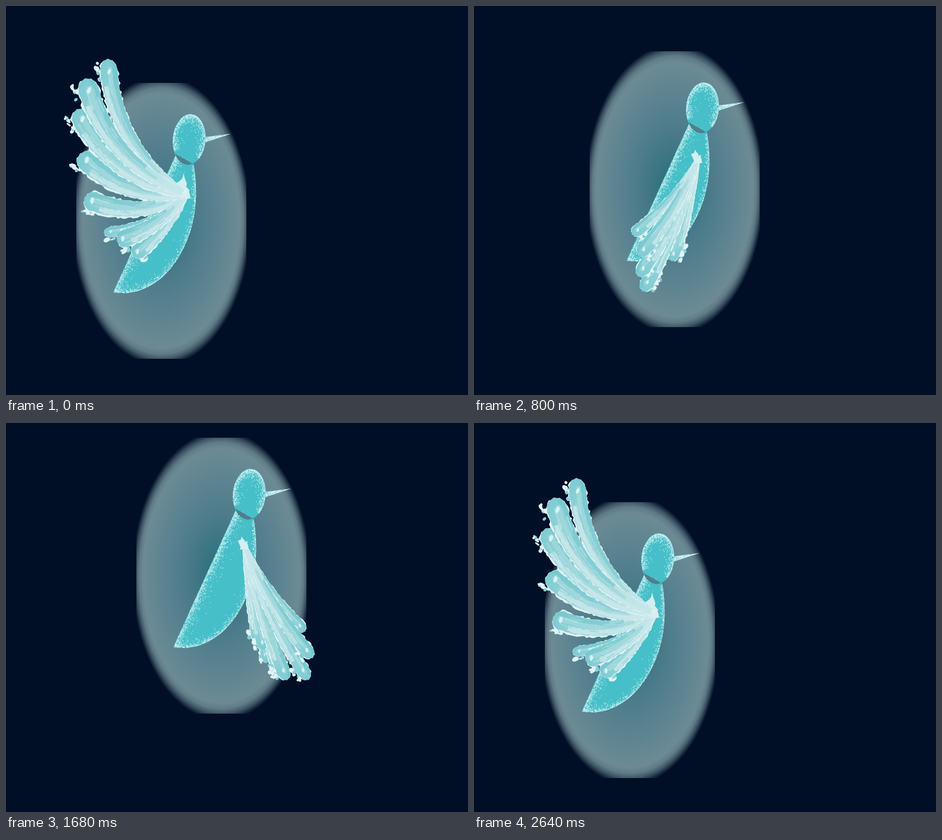
An HTML page with a canvas that plays this animation: 815 by 688 pixels, repeating every 3.12 s.

```html
<!DOCTYPE html>
<html lang="en">
<head>
<meta charset="utf-8">
<title>Hummingbird</title>
<style>
html, body { margin: 0; width: 100%; height: 100%; overflow: hidden; background: #000f26; }
canvas { display: block; }
</style>
</head>
<body>
<canvas id="stage" width="815" height="688"></canvas>
<script>
const W = 815, H = 688, STEP = 80, LOOP = 3120, LAST = 33;
const ctx = document.getElementById('stage').getContext('2d');
const clamp = (v, lo, hi) => Math.min(hi, Math.max(lo, v));
const lerp = (a, b, k) => a + (b - a) * k;

function random(seed) {
  return () => {
    seed = (seed + 0x6D2B79F5) | 0;
    let t = Math.imul(seed ^ (seed >>> 15), 1 | seed);
    t = (t + Math.imul(t ^ (t >>> 7), 61 | t)) ^ t;
    return ((t ^ (t >>> 14)) >>> 0) / 4294967296;
  };
}

// Flight path: time, x, y
const path = [
  [0, 0, 0], [480, 17, -118], [560, 26, -110], [1120, 134, 0],
  [1440, 121, -50], [1680, 106, -110], [1840, 100, -134], [1920, 97, -130],
  [2240, 35, -43], [2320, 13, -14], [2640, 0.5, 3.5]
];

function slope(i, axis) {
  const d = j => (path[j + 1][axis] - path[j][axis]) / (path[j + 1][0] - path[j][0]);
  if (i === 0) return d(0);
  if (i === path.length - 1) return 0;
  const a = d(i - 1), b = d(i);
  return a * b <= 0 ? 0 : 2 * a * b / (a + b);
}

function flight(t, axis) {
  let i = 0;
  while (i < path.length - 2 && t > path[i + 1][0]) i++;
  const p = path[i], q = path[i + 1], h = q[0] - p[0];
  const u = clamp((t - p[0]) / h, 0, 1), u2 = u * u, u3 = u2 * u;
  return (2 * u3 - 3 * u2 + 1) * p[axis] + (u3 - 2 * u2 + u) * h * slope(i, axis) +
    (3 * u2 - 2 * u3) * q[axis] + (u3 - u2) * h * slope(i + 1, axis);
}

// Wing poses: shoulder shift, half width, then feather angles (0 = down) and lengths
const poses = {
  up: { x: 0, y: 0, w: 20, a: [-150, -139, -128, -111, -88, -65, -56, -41], l: [277, 272, 245, 201, 180, 161, 148, 144] },
  back: { x: -3, y: -3, w: 17, a: [-105, -83, -71, -58, -52, -50, -37, -32], l: [173, 187, 209, 202, 194, 165, 154, 147] },
  down: { x: -3, y: -10, w: 10, a: [23, 20, 17, 12.6, 7.5, 9, 8, 6], l: [182, 215, 258, 306, 281, 240, 220, 200] },
  front: { x: -2, y: -8, w: 14, a: [51, 44, 36, 26, 21, 15, 13, 9], l: [176, 216, 263, 248, 240, 202, 185, 167] },
  fold: { x: -8, y: -3, w: 10, a: [-21, -14, -11.5, -12.5, -3, -5.5, 1, 2], l: [225, 294, 267, 260, 257, 251, 202, 190] },
  spread: { x: -1, y: -5, w: 18, a: [-107, -84, -70, -55, -53, -43, -41, -31], l: [178, 189, 211, 207, 190, 146, 145, 131] }
};

function mix(p, q, k) {
  const each = key => p[key].map((v, i) => lerp(v, q[key][i], k));
  return { x: lerp(p.x, q.x, k), y: lerp(p.y, q.y, k), w: lerp(p.w, q.w, k), a: each('a'), l: each('l') };
}

const beats = [
  [0, poses.up], [480, poses.back], [1120, poses.down], [1440, poses.front],
  [1680, mix(poses.front, poses.fold, 0.22)], [1920, poses.fold],
  [2320, poses.spread], [2640, poses.up]
];

function wingAt(t) {
  let i = 0;
  while (i < beats.length - 2 && t > beats[i + 1][0]) i++;
  const [t0, p] = beats[i], [t1, q] = beats[i + 1];
  return mix(p, q, clamp((t - t0) / (t1 - t0), 0, 1));
}

function fillPoly(points, style) {
  ctx.beginPath();
  points.forEach(p => ctx.lineTo(p[0], p[1]));
  ctx.closePath();
  ctx.fillStyle = style;
  ctx.fill();
}

function feather(sx, sy, degrees, len, width, seed) {
  const rnd = random(seed), a = degrees * Math.PI / 180, side = a < 0 ? -1 : 1;
  const dir = [Math.sin(a), Math.cos(a)], up = [side * dir[1], -side * dir[0]];
  const bow = -0.26 * len * Math.min(Math.abs(degrees) / 90, 1);
  const half = s => width * (0.26 + 0.74 * Math.pow(clamp(s, 0, 1), 0.65)) *
    (s > 0.91 ? Math.sqrt(Math.max(0, 1 - ((s - 0.91) / 0.09) ** 2)) : 1);

  // s runs from shoulder to tip, v from the upper (-1) to the lower edge (1)
  function at(s, v, h = half(s)) {
    const arc = 2 * s * (1 - s) * bow, lean = 2 * (1 - 2 * s) * bow / len;
    const n = Math.hypot(1, lean), off = -v * h / n;
    const along = s * len - lean * off, across = arc + off;
    return [sx + dir[0] * along + up[0] * across, sy + dir[1] * along + up[1] * across];
  }

  function band(s0, s1, v0, v1, style, rough) {
    const n = Math.ceil((s1 - s0) * len / 4), top = [], low = [];
    for (let i = 0; i <= n; i++) {
      const s = lerp(s0, s1, i / n), h = half(s);
      top.push(at(s, v0 + (rnd() - 0.5) * rough, h));
      low.unshift(at(s, v1 + (rnd() - 0.5) * rough, h));
    }
    fillPoly(top.concat(low), style);
  }

  const tip = at(1, 0);
  const shade = ctx.createLinearGradient(sx, sy, tip[0], tip[1]);
  shade.addColorStop(0, '#c9e8eb');
  shade.addColorStop(0.55, '#a9dcdf');
  shade.addColorStop(1, '#7fcbd2');

  // Frayed fringe behind the vane
  band(0, 0.99, -1.02, 1.06, '#dff3f5', 0.26);
  for (let i = 0; i < 9; i++) {
    const p = at(0.88 + rnd() * 0.1, 1 + rnd() * 0.35, width);
    ctx.fillStyle = i % 3 ? '#e0f4f6' : '#86cfd6';
    ctx.beginPath();
    ctx.ellipse(p[0], p[1], 1.5 + rnd() * 2.2, 2 + rnd() * 3, -a, 0, 7);
    ctx.fill();
  }
  band(0.02, 1, -0.95, 0.92, shade, 0.1);
  band(0.3, 0.98, -0.92, -0.4, 'rgba(112,198,206,.65)', 0.12);
  band(0.2, 0.95, -0.4, 0.08, 'rgba(160,217,220,.8)', 0.14);
  band(0.05, 0.84, 0.25, 0.82, 'rgba(203,232,236,.85)', 0.18);

  for (let i = 0; i < 12; i++) {
    const s = 0.25 + rnd() * 0.58, v = rnd() * 1.5 - 0.8;
    band(s, s + 0.08 + rnd() * 0.06, v, v + 0.16,
      ['rgba(130,206,212,.5)', 'rgba(188,227,231,.6)', 'rgba(158,217,221,.6)'][i % 3], 0.06);
  }
  const spot = at(0.925, -0.05);
  ctx.fillStyle = 'rgba(225,246,248,.85)';
  ctx.beginPath();
  ctx.ellipse(spot[0], spot[1], width * 0.17, width * 0.3, -a * 0.15, 0, 7);
  ctx.fill();
}

const order = [0, 7, 5, 4, 6, 3, 2, 1];
const girth = [0.85, 1, 1, 1, 0.95, 0.5, 0.85, 0.75];

function drawWing(t, dx, dy) {
  const wing = wingAt(t), x = 318 + dx + wing.x, y = 333 + dy + wing.y;
  const lift = lerp(5, 38, clamp((wing.w - 10) / 10, 0, 1));
  const spread = wing.w * 0.45;
  fillPoly([
    [x - spread * 2, y - lift * 0.5], [x - spread, y - lift * 0.68], [x - 6, y - lift * 0.8],
    [x - 5, y - lift], [x - 2, y - lift * 0.7], [x + 1, y - lift * 0.5], [x, y - lift * 0.35],
    [x + 6, y - 7], [x + 4, y - 3], [x + 7, y + 1], [x + 2, y + 6], [x - 5, y + 7]
  ], '#d3eef0');
  order.forEach(i => feather(x, y, wing.a[i], wing.l[i], wing.w * girth[i], 11 + i * 37));
  for (let i = -2; i <= 2; i++) {
    const bx = x + i * 2.6;
    fillPoly([[bx - 2.5, y + 8], [bx - 1, y - 5 - (i * i * 3) % 5], [bx + 2.5, y + 7]], '#d5eef1');
  }
}

function paintBird() {
  const sprite = document.createElement('canvas');
  sprite.width = W;
  sprite.height = H;
  const g = sprite.getContext('2d'), rnd = random(5);

  g.save();
  g.beginPath();
  g.rect(124, 136, 300, 488);
  g.clip();
  g.translate(274, 380);
  g.scale(150, 244);
  const glow = g.createRadialGradient(0, 0, 0, 0, 0, 1.05);
  [[0, '#2b6d7b'], [0.15, '#33727f'], [0.4, '#4b7b8a'], [0.62, '#5a8290'], [0.8, '#668893'],
    [0.88, '#6c8a94'], [0.92, 'rgba(104,133,144,.92)'], [0.955, 'rgba(104,133,144,.6)'],
    [0.985, 'rgba(104,133,144,.2)'], [1, 'rgba(104,133,144,0)']
  ].forEach(([k, c]) => glow.addColorStop(k, c));
  g.fillStyle = glow;
  g.fillRect(-1, -1, 2, 2);
  g.restore();

  const beak = new Path2D('M350 232 L397 226 L352 241 Z');
  g.fillStyle = '#d6f1f3';
  g.fill(beak);

  const shape = new Path2D('M300 262 L189 506 C235 515 277 488 303 447 C332 400 342 345 331 280 Z');
  const head = new Path2D();
  head.ellipse(323, 236, 29, 45, 0.08, 0, Math.PI * 2);
  shape.addPath(head);
  g.fillStyle = '#47bfc8';
  g.fill(shape);

  function stipple(count, depth, edge) {
    for (let i = 0; i < count; i++) {
      const [x, y, nx, ny] = edge(rnd()), d = -Math.log(1 - rnd()) * depth;
      const size = 0.8 + rnd() * 0.8;
      g.fillRect(x + nx * d, y + ny * d, size, size);
    }
  }
  const cubic = (p, u) => {
    const v = 1 - u;
    return [0, 1].map(k => v * v * v * p[k] + 3 * v * v * u * p[2 + k] + 3 * v * u * u * p[4 + k] + u * u * u * p[6 + k]);
  };
  const inward = ([x, y]) => {
    const dx = 255 - x, dy = 385 - y, n = Math.hypot(dx, dy);
    return [x, y, dx / n, dy / n];
  };

  g.save();
  g.clip(shape);
  g.fillStyle = 'rgba(205,240,242,.8)';
  stipple(1500, 5, u => [lerp(300, 189, u), lerp(262, 506, u), 0.91, 0.41]);
  stipple(550, 2.8, u => inward(cubic([331, 280, 342, 345, 332, 400, 303, 447], u)));
  stipple(650, 3.5, u => inward(cubic([303, 447, 277, 488, 235, 515, 189, 506], u)));
  stipple(1100, 3.8, u => {
    const a = lerp(2.6, 7.1, u), c = Math.cos(a), s = Math.sin(a);
    return [323 + 29 * c - 3.6 * s, 236 + 45 * s + 2.3 * c, -c, -s];
  });
  g.restore();

  g.save();
  g.clip(beak);
  g.fillStyle = '#6cc8d0';
  for (let i = 0; i < 140; i++) g.fillRect(350 + 42 * rnd() ** 1.6, 226 + rnd() * 15, 1.1, 1.1);
  g.restore();
  return sprite;
}

const bird = paintBird();

function draw(now) {
  const t = Math.min(LAST, Math.floor((now % LOOP) / STEP)) * STEP;
  const dx = Math.round(flight(t, 1)), dy = Math.round(flight(t, 2));
  ctx.fillStyle = '#000f26';
  ctx.fillRect(0, 0, W, H);
  ctx.drawImage(bird, dx, dy);
  drawWing(t, dx, dy);
}

const start = performance.now();
function tick() {
  draw(performance.now() - start);
  requestAnimationFrame(tick);
}
tick();
</script>
</body>
</html>
```
